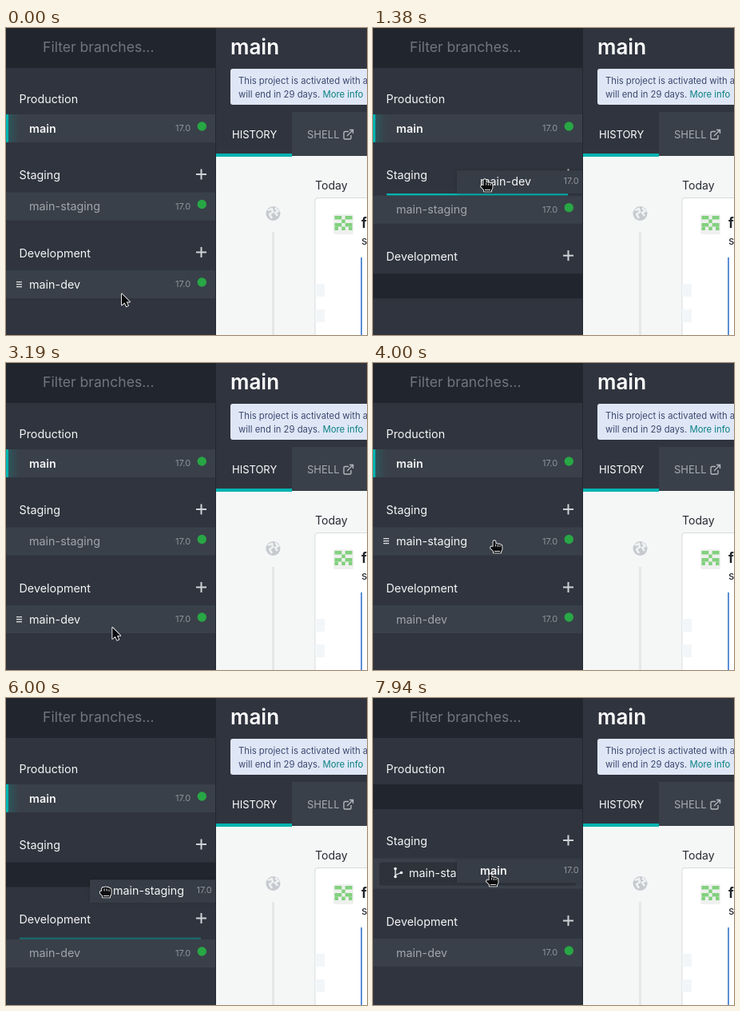
Write an HTML page with a canvas that moves like this. It is 452x384 px and loops after 8000 ms.

```html
<!DOCTYPE html>
<html lang="en">
<head>
<meta charset="utf-8">
<title>Branch list</title>
<style>
html, body { margin: 0; width: 100%; height: 100%; overflow: hidden; background: #30343e; }
canvas { display: block; width: 452px; height: 384px; }
</style>
</head>
<body>
<canvas id="stage" width="452" height="384"></canvas>
<script>
const ctx = document.getElementById('stage').getContext('2d');
const LOOP = 8000, STEP = 62.5, SIDE = 263, LABEL = 14.35;
const C = {
  side: '#30343e', dark: '#21252d', row: '#394049', teal: '#00b3b0',
  white: '#f4f5f6', dim: '#a0a5ab', faint: '#8f959c', green: '#28a745'
};
const names = ['main', 'main-staging', 'main-dev'];

// Each row is pulled from home to away and back; grip is the cursor's
// height relative to the row label at both ends.
const drags = [
  { row: 2, press: 120, lift: 870, drop: 3185, enter: 1295, leave: 2190,
    out: 815, outEnd: 1400, back: 2130, backEnd: 2870,
    home: 321, away: 191, grip: [10, -2], x: [145, 141, 133] },
  { row: 1, press: 3995, lift: 4370, drop: 6495, enter: 4740, leave: 5838,
    out: 4320, outEnd: 5060, back: 5630, backEnd: 6190,
    home: 223, away: 289, grip: [-1, 1], x: [153, 142, 128] },
  { row: 0, press: 7370, lift: 7620, drop: 8000, enter: 7800, leave: 8000,
    out: 7570, outEnd: 7940, back: 8000, backEnd: 8500,
    home: 126, away: 216, grip: [0, 4], x: [150, 148, 148] }
];

const mix = (a, b, p) => a + (b - a) * p;
function ramp(t, from, to) {
  const u = Math.min(1, Math.max(0, (t - from) / (to - from)));
  return u * u * (3 - 2 * u);
}

// 0 at home, 1 at the far end
const reach = (d, t) => ramp(t, d.out, d.outEnd) - ramp(t, d.back, d.backEnd);
const cloneY = (d, t) => mix(d.home, d.away, reach(d, t));
const opening = (d, t) => ramp(t, d.enter, d.enter + 240) - ramp(t, d.leave, d.leave + 240);

function grabPoint(d, t) {
  const lead = t + 30, p = reach(d, lead), r = ramp(lead, d.back, d.backEnd);
  const bow = 14 * Math.sin(Math.PI * r);
  return {
    x: mix(mix(d.x[0], d.x[1], ramp(lead, d.out, d.outEnd)), d.x[2], r) - bow,
    y: mix(d.home + d.grip[0], d.away + d.grip[1], p)
  };
}

function cursorAt(t) {
  let at = grabPoint(drags[0], t);
  for (let i = 1; i < drags.length; i++) {
    const p = ramp(t, drags[i - 1].drop - 55, drags[i].press - 60);
    const next = grabPoint(drags[i], t);
    at = { x: mix(at.x, next.x, p), y: mix(at.y, next.y, p) };
  }
  return at;
}

function box(x, y, w, h, color, r = 0) {
  ctx.fillStyle = color;
  ctx.beginPath();
  ctx.roundRect(x, y, w, h, r);
  ctx.fill();
}

function text(s, x, y, size, color, weight = 400) {
  ctx.font = `${weight} ${size}px Inter, "Open Sans", sans-serif`;
  ctx.fillStyle = color;
  ctx.fillText(s, x, y);
}

function disc(x, y, r, color) {
  ctx.fillStyle = color;
  ctx.beginPath();
  ctx.arc(x, y, r, 0, 7);
  ctx.fill();
}

function stroke(path, color, width) {
  ctx.strokeStyle = color;
  ctx.lineWidth = width;
  ctx.stroke(new Path2D(path));
}

function drawPage() {
  box(SIDE, 0, 189, 105, C.side);
  text('main', 281, 32.5, 26, '#fff', 600);
  box(281, 51, 180, 45, '#dfe7f6', 3);
  text('This project is activated with a', 291, 69.5, 11.3, '#3c4870');
  text('will end in 29 days. ', 291, 86.5, 11.3, '#3c4870');
  const w = ctx.measureText('will end in 29 days. ').width;
  text('More info', 291 + w, 86.5, 11.3, '#0a8084');

  box(358, 105, 94, 55, C.row);
  box(SIDE, 105, 95, 55, C.side);
  text('HISTORY', 283, 138, 13, '#fff');
  text('SHELL', 377, 138, 13, '#a7abb1');
  stroke('M429 129.5H424.5Q423 129.5 423 131V137.5Q423 139 424.5 139H430.5Q432 139 432 137.5V134M427 135L434 128M430 127.5H434.5V132', '#b3b7bc', 1.4);

  box(SIDE, 160, 189, 224, '#f5f7f7');
  box(SIDE, 157, 95, 4, C.teal);
  text('Today', 387, 202, 14.1, '#272b32');
  box(333, 255, 3, 129, '#e5e7e8');
  disc(334.5, 232, 9, '#c6cacf');
  stroke('M328 228L333 226L334 230L330 233L333 238M337 225L341 229L337 231L340 235', '#eff1f2', 2.5);
  box(386.5, 212, 80, 190, '#d7dadc', 4);
  box(387.5, 213, 80, 190, '#fff', 3);
  box(387, 320, 12, 16, '#f3f6f8');
  box(387, 352, 12, 16, '#f3f6f8');
  box(410, 233, 25, 25, '#eef0ee', 2);
  ['11011', '00100', '11011', '10101'].forEach((line, j) => {
    [...line].forEach((bit, i) => {
      if (bit === '1') box(411.5 + i * 4.4, 235 + j * 4.5, 4.4, 4.5, '#80d07c');
    });
  });
  text('f', 445, 250, 17, '#20242b', 700);
  text('s', 445, 271, 14, '#20242b');
  box(444, 287, 2, 97, '#5b8fd6');
}

function drawHeader(label, y, plus) {
  text(label, 16.5, y + 5, LABEL, C.white);
  if (plus) {
    box(238, y - 2, 13, 2, '#cfd2d6');
    box(243.5, y - 7.5, 2, 13, '#cfd2d6');
  }
}

function drawRow(id, top, hover) {
  const y = top + 17.5;
  box(0, top, 262, 35, C.row);
  if (id === 0) {
    const glow = ctx.createLinearGradient(3, 0, 16, 0);
    glow.addColorStop(0, 'rgba(0,179,176,.18)');
    glow.addColorStop(1, 'rgba(0,179,176,0)');
    box(3, top, 13, 35, glow);
    box(0, top, 3, 35, C.teal);
  }
  if (hover) for (let i = 0; i < 3; i++) box(13, Math.round(y) - 4 + i * 3, 7, 1.3, '#dddfe2');
  text(names[id], 29, y + 5, LABEL, id === 0 || hover ? C.white : C.dim, id === 0 ? 600 : 400);
  text('17.0', 212, y + 3.5, 11, C.faint);
  disc(245.3, y - 2.5, 5.7, C.green);
}

function drawMergeTarget(top, height) {
  box(0, top, 262, height, C.row);
  box(8, top + 5, 246, 29, '#2d323b', 2);
  const y = top + 18;
  stroke(`M28 ${y - 5}V${y + 5}M28 ${y + 3}L35 ${y}`, C.white, 1.3);
  [[28, -5], [28, 5], [35.5, 0]].forEach(([x, d]) => disc(x, y + d, 1.8, C.white));
  text(names[1], 45, y + 5.5, LABEL, C.white);
}

function drawLine(y, alpha) {
  ctx.globalAlpha = alpha;
  box(17, y, 227, 2.5, C.teal);
  ctx.globalAlpha = 1;
}

function drawClone(id, y) {
  ctx.save();
  ctx.beginPath();
  ctx.rect(0, 0, 262, 384);
  ctx.clip();
  ctx.shadowColor = 'rgba(0,0,0,.22)';
  ctx.shadowBlur = 5;
  box(105, y - 13.5, 180, 29, '#373d46');
  ctx.shadowColor = 'transparent';
  text(names[id], 134, y + 5, LABEL, C.white, id === 0 ? 600 : 400);
  text('17.0', 238.5, y + 3.5, 11, C.faint);
  ctx.restore();
}

const cursors = {
  arrow: ['M0 1.5V15.5L3.5 12.5L5.8 17.3L8 16.3L5.8 11.6H10Z', ''],
  hand: ['M-2.5 1Q-1 -.5 .5 1V4.5Q2 3.5 3.3 4.8Q5 4 6 5.3Q8.5 5 8.5 7.5V11Q8.5 13 7 13.5V15.5H-2V13.5L-6 9.5Q-5.5 6.5 -2.5 8Z',
    'M.7 5V7.5M3.4 5.5V8M6 6V8M-1 13.5H6'],
  fist: ['M-2.5 3Q-1.5 .5 .5 1.6Q2 0 3.6 1.6Q5.5 .6 6.6 2.4Q9 2 9 5V9Q9 11 7.5 12V14H-1.5V12L-4.5 9Q-5.5 5.5 -2.5 6Z',
    'M.5 3V6M3.5 3V6M6.4 4V6.5M-.5 12H6.5']
};

function drawCursor(kind, { x, y }) {
  const [shape, detail] = cursors[kind];
  ctx.save();
  ctx.translate(x, y);
  ctx.lineJoin = 'round';
  stroke(shape, '#fff', 1.7);
  ctx.fillStyle = '#0b0c0e';
  ctx.fill(new Path2D(shape));
  stroke(detail, '#fff', 0.9);
  ctx.restore();
}

function draw(t) {
  const drag = drags.find(d => t >= d.press && t < d.drop);
  const lifted = drag && t >= drag.lift ? drag.row : -1;
  const onTarget = drag && t >= drag.enter && t < drag.leave;
  const open = drag ? opening(drag, t) : 0;
  const cursor = cursorAt(t);

  drawPage();
  box(0, 0, SIDE, 384, C.side);
  box(0, 0, 262, 50, C.dark);
  text('Filter branches...', 46, 30, 17.6, '#71767e');

  let head = 89;
  ['Production', 'Staging', 'Development'].forEach((label, id) => {
    drawHeader(label, head, id > 0);
    // staging and development rows swap places; main merges into staging
    const gap = lifted > 0 && id === 3 - lifted ? 16 * open : 0;
    if (gap > 0) drawLine(head + 22.5 + gap / 8, onTarget ? 1 : Math.min(1, gap / 10));
    const top = head + (id ? 21.5 : 19) + gap;
    let height = 35;
    if (id === lifted) {
      height = 30;
      box(0, top, 262, 31, C.dark);
    } else if (id === 1 && lifted === 0 && onTarget) {
      height += 5 * open;
      drawMergeTarget(top, height);
    } else {
      drawRow(id, top, lifted < 0 && cursor.y >= top && cursor.y < top + 35);
    }
    head = top + height + 41;
  });

  if (lifted >= 0) drawClone(lifted, cloneY(drag, t));
  box(262, 0, 1, 384, '#23272f');
  drawCursor(!drag ? 'arrow' : lifted < 0 || onTarget ? 'hand' : 'fist', cursor);
}

const start = performance.now();
function tick() {
  const t = (performance.now() - start) % LOOP;
  draw(Math.floor((t + 3) / STEP) * STEP % LOOP);
  requestAnimationFrame(tick);
}
tick();
</script>
</body>
</html>
```
